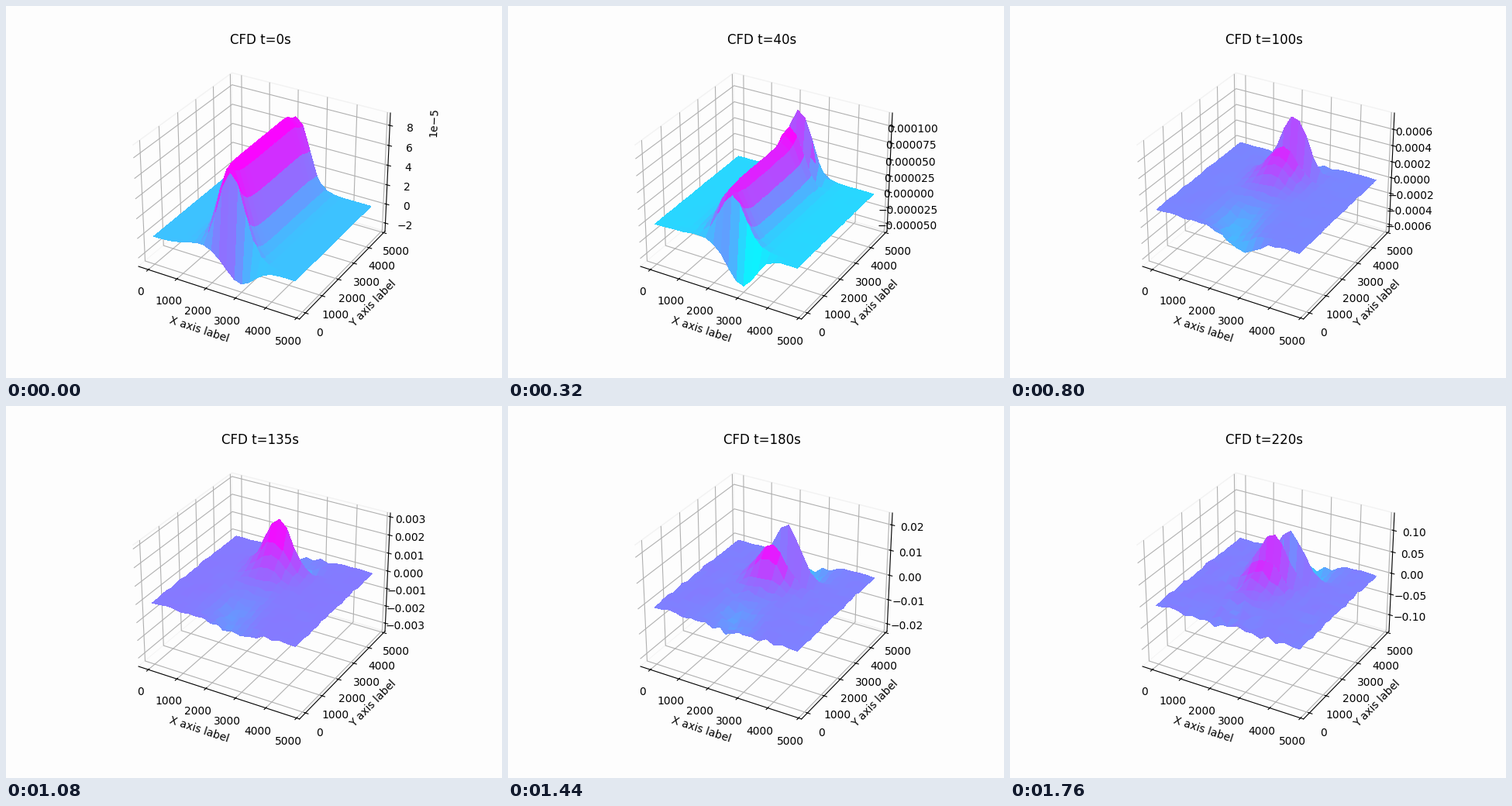
A matplotlib script for the animation above (1800 ms loop, 640 by 480 pixels).

```python
import numpy as np
import matplotlib.pyplot as plt
from matplotlib.animation import FuncAnimation

N, STEP, FRAMES, DT = 20, 250, 45, 5
PAPER = "#fdfdfd"
WIDTH = 1.75     # ridge width in grid cells
UNIT = 0.0075    # one height unit as a share of the value span
PAD = 0.0729     # free space beyond the data on each axis side

TIMES = [0, 40, 70, 100, 135, 180, 220]
SPAN = [1.055e-4, 1.59e-4, 4.0e-4, 1.3e-3, 5.83e-3, 0.0417, 0.2445]
ZERO = [0.199, 0.32, 0.4625, 0.458, 0.523, 0.482, 0.501]  # level of z = 0
LOW = [-32, -13, -21, -44, -62, -47, -42]                 # colour limits
HIGH = [102, 68, 54, 48, 57, 47, 42]

# Ridge heights along y: the two front rows, then six rows around a wave
FRONT = [(-26, 104), (-45, 60), (-38, -14), (-21, -18),
         (-9, -12), (-2, -9), (0, 0)]
WAVE_ROW = [17, 17, 15, 15, 15, 13, 13]
WAVE = [(104, 104, 103, 97, 95, 40), (62, 66, 74, 8, 87, 30),
        (42, 47, 52, 36, 68, 52), (25, 32, 40, -28, 70, -10),
        (28, 42, 66, 15, -55, -10), (16, 34, 47, -55, 65, -45),
        (38, -8, 57, -72, 54, -48)]

cells = np.arange(N)
X, Y = np.meshgrid(cells * STEP, cells * STEP)
grain = np.random.default_rng(4).normal(size=(N, N))


def bell(x, centre, width):
    return np.exp(-((x - centre) ** 2) / (2 * width ** 2))


def profile(t, front, row, wave):
    """Height and centre of the ridge in each row."""
    start = row - 3
    height = np.interp(cells, [*range(start, row + 3), N + 1], [*wave, 0])
    rise = (cells[1:start] - 1) / (start - 1)
    power = np.clip(t / 25 - 1.8, 1, 4)
    height[1:start] = front[1] + (wave[0] - front[1]) * rise ** power
    height[0] = front[0]
    lean = t / TIMES[-1] * np.clip(cells - row, -1, 3) / 2
    return height, 9.2 + 2.6 * np.exp(-cells) + lean


PROFILES = np.array([profile(*p) for p in zip(TIMES, FRONT, WAVE_ROW, WAVE)])


def at(t, values):
    return np.interp(t, TIMES, values)


def heights(t):
    k = min(np.searchsorted(TIMES, t, side="right") - 1, len(TIMES) - 2)
    f = (t - TIMES[k]) / (TIMES[k + 1] - TIMES[k])
    height, centre = (1 - f) * PROFILES[k] + f * PROFILES[k + 1]
    h = height[:, None] * bell(cells[None, :], centre[:, None], WIDTH)
    h[0] += 10 * np.exp(-t / 40) * bell(cells, 6.5, 2)
    return h + t / 110 * grain * (0.6 + bell(cells, 9, 3))


fig = plt.figure(figsize=(6.4, 4.8), dpi=100, facecolor=PAPER)
ax = fig.add_subplot(projection="3d", facecolor=PAPER)
edge = (N - 1) * STEP
ax.set_xlim(-PAD * edge, (1 + PAD) * edge)
ax.set_ylim(-PAD * edge, (1 + PAD) * edge)
ax.set_xlabel("X axis label")
ax.set_ylabel("Y axis label")
for axis in (ax.xaxis, ax.yaxis, ax.zaxis):
    axis.set_pane_color(PAPER)
    axis.pane.set_edgecolor("#f2f2f2")
surface = None


def draw(n):
    global surface
    if surface is not None:
        surface.remove()
    t = n * DT
    span = np.exp(at(t, np.log(SPAN)))
    zero = at(t, ZERO)
    scale = UNIT * span
    ax.set_zlim((-zero - PAD) * span, (1 - zero + PAD) * span)
    surface = ax.plot_surface(X, Y, heights(t) * scale, cmap="cool",
                              vmin=at(t, LOW) * scale,
                              vmax=at(t, HIGH) * scale,
                              linewidth=0, antialiased=False)
    ax.set_title(f"CFD t={t}s")
    return (surface,)


anim = FuncAnimation(fig, draw, frames=FRAMES, interval=40,
                     init_func=lambda: (), repeat=True, repeat_delay=0)
plt.show()
```
